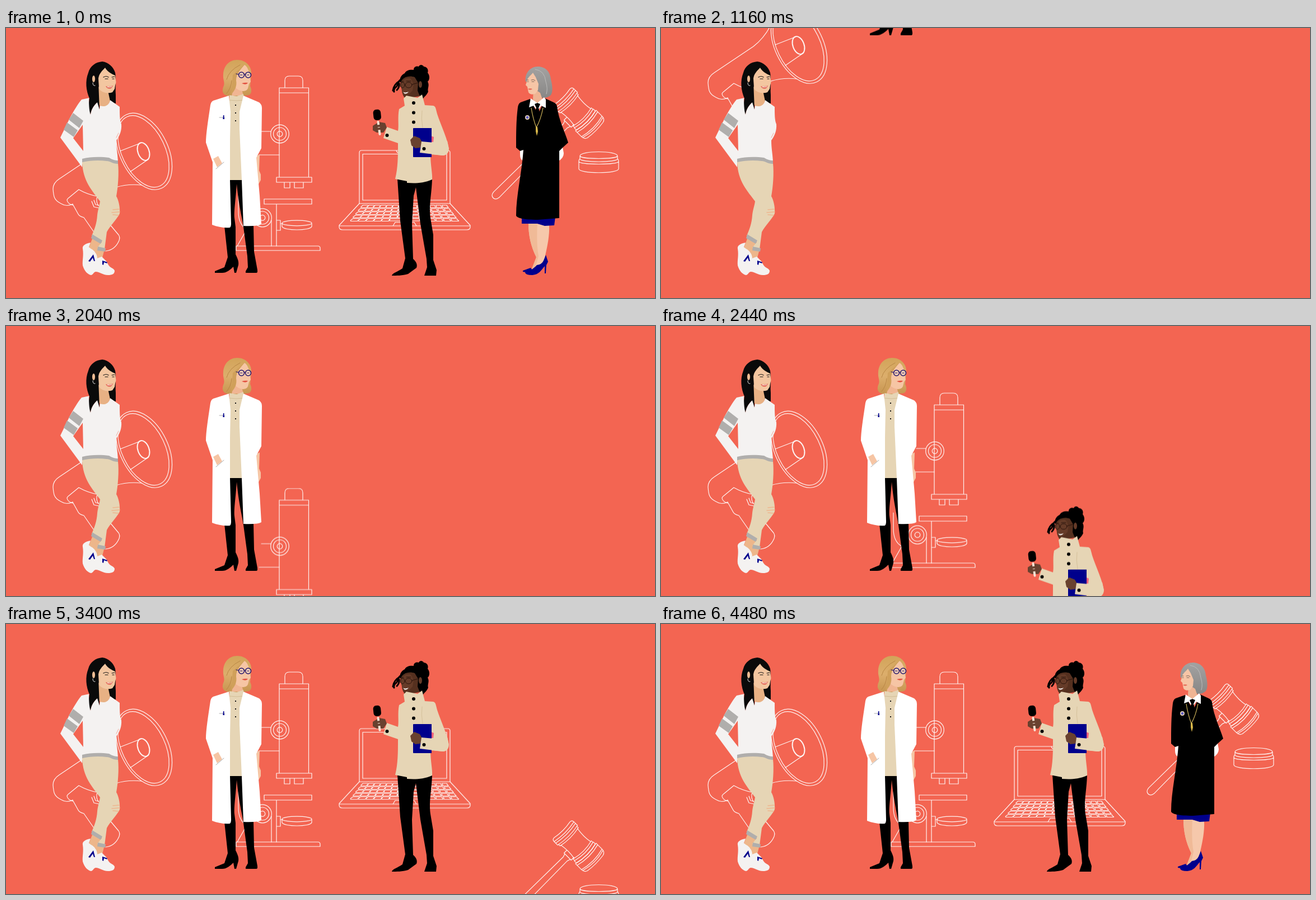
An HTML page that plays this animation: 1159x483 px, repeating every 7.28 s.

```html
<!DOCTYPE html>
<html lang="en">
<head>
<meta charset="utf-8">
<title>Four women at work</title>
<style>
html, body { margin: 0; width: 100%; height: 100%; overflow: hidden; background: #f36552; }
svg { display: block; width: 100vw; height: 100vh; }
.line { fill: none; stroke: #fff; stroke-opacity: .92; stroke-width: 1.2; stroke-linejoin: round; stroke-linecap: round; }
.cream { fill: #e6d5b5; }
.navy { fill: #00008c; }
.white { fill: #fff; }
.knit { fill: #f4f2f1; }
.gray { fill: #b0aeac; }
.thin { fill: none; stroke-linecap: round; }
</style>
</head>
<body>
<svg viewBox="0 0 1159 483" preserveAspectRatio="none">
<defs>
  <linearGradient id="silver" x1="0" y1="0" x2="0" y2="1">
    <stop offset="0" stop-color="#a3a2a1"/><stop offset="1" stop-color="#888786"/>
  </linearGradient>
  <linearGradient id="blonde" x1="0" y1="0" x2="0" y2="1">
    <stop offset="0" stop-color="#d2a459"/><stop offset=".5" stop-color="#dcae6c"/><stop offset="1" stop-color="#c79550"/>
  </linearGradient>
</defs>

<g id="megaphone" class="line">
  <ellipse cx="246.500" cy="220.700" rx="43" ry="73" transform="rotate(-25.7 246.5 220.7)"/>
  <ellipse cx="245.500" cy="220.700" rx="38.500" ry="68.500" transform="rotate(-25.7 245.5 220.7)"/>
  <ellipse cx="245.500" cy="221" rx="10" ry="16.500" stroke-width="2" transform="rotate(-20 245.5 221)"/>
  <path d="M204 220L240 206M222 257L254 235"/>
  <path d="M195 187C188 200 178 213 165 223L95 270Q84 277 84 288C85 300 85 308 98 314C106 319 112 318 119 315"/>
  <path d="M119 317Q110 314 109 308Q109 306 113 303L130 289Q146 298 163 301C180 290 205 277 242 281"/>
  <path d="M119 315L129 333Q131 337 139 339L157 365L172 388M186 352L201 370Q204 374 202 380Q195 397 178 399M153 310L157 320L166 322M157 308L160 316L166 317M163 301Q160 310 165 318"/>
</g>

<g id="activist">
  <path fill="#0a0a0a" d="M172 60C183 61 192 70 195 80C197 92 195 105 196 120V135L186 133L180 120L165 125L167 146L163 133C155 140 152 148 151 155C147 148 147 138 149 126C143 112 141 95 147 80C150 68 160 61 172 60Z"/>
  <path fill="#e8b184" d="M165 105L182 112L186 131L180 141H170L164 134Z"/>
  <path fill="#f3c6a0" d="M177 71C172 76 166 82 165 90L166 109C172 116 182 118 190 115L194 109L195 103L196.500 97L195 85C188 82 181 78 177 71Z"/>
  <ellipse cx="156.500" cy="91" rx="2.600" ry="6" fill="#eebb92"/>
  <path class="thin" stroke="#eee" d="M155 98Q155 104 159 103"/>
  <path fill="#0a0a0a" d="M176 70C168 76 164 84 165 96L167 146L160 128L160 86Z"/>
  <path class="thin" stroke="#111" stroke-width="1.200" d="M174 88Q179 85 183 88M189 88L194 87M177 91H182M190 91H193"/>
  <path fill="#e2604f" d="M178 104Q185 106 191 103Q189 109 184 108.500Q180 108 178 104Z"/>
  <path class="thin" stroke="#fff" d="M181 105.500Q186 106.500 189 105"/>
  <path class="knit" fill-rule="evenodd" d="M149 125L135 128C128 136 120 150 113 163L97 196L136 249V234L200 239C199 222 197 215 197 201C203 193 207 183 206 172C203 165 203 155 203 141L186 129C184 139 176 142 168 139L167 146L163 133C155 140 152 148 151 155Q148 148 148 126ZM137 173L120 197L138 220Z"/>
  <path class="thin" stroke="#f3a99d" d="M201 188L197 196"/>
  <path class="gray" d="M120 152L138 166L131 179L112 164ZM109 169L128 183L121 195L103 182Z"/>
  <path fill="#edb68a" d="M154 377L148 393L160 402L161 413L172 411L176 396L170 383Z"/>
  <path class="cream" d="M136 239C150 236 165 235 180 237L200 242C202 260 200 285 197 301C201 308 204 320 203 332C198 342 185 355 180 365L176 396L163 393L171 383L153 372C158 360 162 350 163 335C164 325 167 318 168 310C155 292 137 275 136 239Z"/>
  <path class="gray" d="M136 234C150 230 170 230 184 232C190 236 196 237 200 237V243C190 243 186 238 180 238C165 236 150 237 136 240ZM154 369L172 380L169 386L152 376ZM164 391L178 394L177 400L163 398Z"/>
  <path class="thin" stroke="#eeb68f" stroke-width="1.600" d="M191 325L202 324M189 330L203 329M191 334L201 335"/>
  <path class="knit" d="M151 384C140 386 136 390 137 395C139 408 136 415 137 425C140 435 146 441 152 442C156 441 156 437 160 436C168 436 172 442 182 442C190 442 194 440 194 434C192 429 187 430 183 424L179 417L171 409L163 412C163 405 158 398 152 395L148 392Z"/>
  <path class="navy" d="M147 417L156 405L159 417L157 417L155 411L150 418ZM172 416L181 419L180 421L175 419L174 424L172 423Z"/>
</g>

<g id="scope" class="line">
  <path d="M498 107V94Q498 86 506 86H522Q530 86 530 94V107M488 107H540.500V267H488ZM488 116H540.500M483 267H546V276H483ZM497 276V286H507V276M515 276V286H531V276"/>
  <path d="M456 185H473M452 227H488M461 306H546V315H461ZM483 315V390M483 344H490V362H483M490 350H494M474 344V390M415 300V328Q415 352 430 360L413 390"/>
  <path d="M411 398V390H557Q561 390 561 394V398Z"/>
  <ellipse cx="519.500" cy="349" rx="26.500" ry="4.800"/>
  <path d="M493 350V355C495 363 544 363 546 355V350"/>
  <g id="knob"><circle cx="489" cy="189.500" r="16.300"/><circle cx="489" cy="189.500" r="11.500"/><circle cx="489" cy="189.500" r="4.800"/></g>
  <use href="#knob" x="-31" y="150"/>
</g>

<g id="scientist">
  <path fill="url(#blonde)" d="M413 57C428 57 438 68 438 80L436 104C440 112 438 118 434 120L420 122H398C386 120 385 112 389 103C391 97 387 92 388 82C389 68 398 57 413 57Z"/>
  <path fill="#f0b592" d="M408 100L403 121H424L421 110Z"/>
  <path fill="#f6c5a4" d="M426 66C418 74 411 82 408 98L411 108C418 114 429 115 432 108L434 100L437 96L435 86C434 76 431 69 426 66Z"/>
  <path fill="#d0a05a" d="M426 65C418 76 411 82 411 94C413 104 408 114 401 119C404 106 404 94 405 84Z"/>
  <path class="thin" stroke="#b98745" d="M418 66Q398 76 394 92M403 94Q402 108 394 117"/>
  <g fill="#f3cdb5" stroke="#20146b" stroke-width="1.500"><circle cx="420.500" cy="84" r="5"/><circle cx="432.500" cy="84" r="5"/></g>
  <path class="thin" stroke="#20146b" stroke-width="1.200" d="M415 83L411 82M425 83H428M418 84H422M431 84H434"/>
  <path fill="#e2503f" d="M421 99Q427 97 432 98Q429 103 421 99Z"/>
  <path fill="#000" d="M399 271H421L425 300L436 340L442 354L443 400L449 433V436Q449 438 446 438H428V435L432 428L431 408L424 356C421 335 416 320 412 279C410 310 407 325 408 340L410 356V405C414 413 416 418 415 424L411 438H408L406 427C400 433 394 438 386 438H373V435L390 428L396 410L390 354Z"/>
  <path class="cream" d="M399 120L412 122L424 118L425 131L422 272H399Z"/>
  <path class="thin" stroke="#d2bd96" d="M399 129L411 130L424 129"/>
  <path fill="#111" d="M409 137h2v2h-2zM409 151h2v2h-2zM409 165h2v2h-2z"/>
  <path fill="#f6c5a4" d="M446 230L453 226L452 255L455 262V272L449 283L446 275Z"/>
  <path class="white" d="M398 121L370 130Q366 132 365 138C361 165 357 190 357 205L369 240L368 352C378 356 390 358 400 357Q402 355 402 350L400 272V200L401 150ZM424 121L452 133Q457 137 457 143L456 215L447 232L453 300L456 351Q450 355 424 354L421 272L417 180V150Z"/>
  <path fill="#f6c5a4" d="M370 234L379 229L386 242L377 249Z"/>
  <path class="thin" stroke="#aaa" d="M375 252L389 240M381 160H391"/>
  <path class="navy" d="M388 156h1.500v4l.8 3h-3z"/>
</g>

<g id="laptop" class="line">
  <path d="M631 314V223Q631 219 635 219H789Q793 219 793 223V314M637 225.500H787V308H637ZM697 219Q698 223 701 223H723Q726 223 727 219"/>
  <path d="M631 314H793L829 353V356Q829 361 823 361H601Q595 361 595 356V353ZM595 354H829M691 354L695 347.500H729L733 354"/>
</g>

<g id="reporter">
  <path fill="#000" d="M728 75C728 68 735 68 737 69C739 64 745 66 746 69C752 69 755 75 753 80C757 85 757 92 753 96C757 103 752 108 754 114C751 121 747 122 744 128C741 121 738 120 733 118L728 98L714 88L704 98C702 90 706 84 712 81C715 75 722 74 728 75Z"/>
  <path class="thin" stroke="#000" stroke-width="3" d="M706 92C698 95 702 102 696 106Q692 109 693 114M704 94C697 98 692 104 691 112M702 99Q703 106 698 111"/>
  <path fill="#55301f" d="M705 97C708 88 720 84 730 88L736 98L735 112L739 122L713 126C708 121 706 112 707 106L704 105Z"/>
  <path fill="#653b28" d="M706 98Q712 88 722 90Q730 98 726 112Q718 122 710 119L706 108Z"/>
  <ellipse cx="740" cy="101" rx="3" ry="6" fill="#653b28"/>
  <g class="thin" stroke="#2b140c"><ellipse cx="708" cy="102" rx="4" ry="5"/><ellipse cx="719" cy="102" rx="6" ry="5"/><path d="M725 101L736 98M706 96L710 96M715 95L723 95"/></g>
  <path class="white" d="M709 114.500Q714 116.500 719 114Q716 118 712 117.500Z"/>
  <path fill="#000" d="M699 270L730 274L761 270C760 300 755 315 758 340L763 370V415L769 433L768 443H747L752 428L751 413L740 350L732 285L728 300L725 350L727 413C733 418 735 424 733 429L718 440C708 443 697 443 689 443C690 438 700 436 708 430L713 412L704 345Z"/>
  <path class="cream" d="M710 126L715 121L735 125L743 119L748 138L763 139Q767 140 768 146C772 165 786 190 791 215Q791 227 780 228L758 226C758 245 762 262 761 271C745 278 730 278 716 277V274L695 270C700 250 700 230 700 206L674 197L680 177L700 184C702 175 699 160 702 145L712 139Z"/>
  <path class="thin" stroke="#d5c19b" d="M743 148Q741 162 744 178"/>
  <path fill="#69412f" d="M655 175L666 168L677 170L680 178L674 187L662 187L655 183Z"/>
  <path class="thin" stroke="#f6e2d3" stroke-width="4" d="M664.500 168L667.500 190"/>
  <path class="thin" stroke="#69412f" stroke-width="4" d="M658 176L668 175M659 181L668 180"/>
  <rect x="656" y="146" width="13.500" height="19" rx="5.500" transform="rotate(-6 662 155)"/>
  <path fill="#f0607a" d="M759 193L764 195L763 204H759Z"/>
  <path class="navy" d="M727 180Q727 179 728 179H760V231H728Q727 231 727 230Z"/>
  <path fill="#69412f" d="M722 200L729 193L739 197L743 204L740 214L731 215L724 210Z"/>
  <path class="cream" d="M742 203L764 205L768 190L788 202C792 218 790 228 780 228L739 223Z"/>
  <g><circle cx="728" cy="134" r="3"/><circle cx="728" cy="151.500" r="3"/><circle cx="728" cy="168.500" r="3"/><circle cx="680.500" cy="192" r="3"/><circle cx="746.500" cy="216" r="3"/></g>
</g>

<g id="gavel" class="line">
  <g transform="translate(1022 152) rotate(45)">
    <path d="M-36 -25Q-41 -25 -41 -20Q-37 0 -41 20Q-41 25 -36 25H-27Q-22 0 -27 -25ZM-36 -25Q-31 0 -36 25M-32 -25Q-27 0 -32 25M-27 -23H-23Q-18 0 -23 23H-27"/>
    <path d="M-23 -21Q-5 -18 10 -21M-23 21Q-5 18 10 21M10 -23H14Q20 0 14 23H10Q16 0 10 -23ZM14 -24H19Q25 0 19 24H14"/>
    <path d="M19 -26H34Q41 -26 43 -20Q46 0 43 20Q41 26 34 26H19Q26 0 19 -26M23 -26Q30 0 23 26M34 -26Q41 0 34 26M37 -25Q44 0 37 25"/>
    <path d="M-9 20V27H9V20M-7 27L-5 33L-7 207Q-6 215 0 215Q6 215 7 207L5 33L7 27"/>
  </g>
  <path d="M1025 229C1025 219 1092 219 1092 229V234C1092 241 1025 241 1025 234ZM1025 229C1027 235 1090 235 1092 229M1025 234Q1023 235 1023 239V252C1024 261 1093 261 1094 252V239Q1094 235 1092 234M1023 239C1026 245 1091 245 1094 239"/>
</g>

<g id="judge">
  <path fill="url(#silver)" d="M950 69C963 69 972 78 973 92C976 103 977 114 973 120C966 126 958 126 951 124L940 98L928 96C926 82 935 69 950 69Z"/>
  <path fill="#efb493" d="M942 108L954 116L958 128L949 136L941 128Z"/>
  <path fill="#f6c5a6" d="M941 80C936 86 930 90 930 96L928 102L931 105L933 115C936 120 942 119 946 117L950 111L951 100L946 88Z"/>
  <path class="thin" stroke="#bcbbba" d="M945 74Q962 76 964 96Q968 108 965 118"/>
  <path class="thin" stroke="#7b6257" d="M930 93H933M938 93Q942 91 945 94M931 96H933M939 96H943"/>
  <path fill="#e2604f" d="M932 109Q936 107.500 940 109Q936 112 932 109Z"/>
  <path fill="#f6c8ab" d="M933 349L970 352C971 370 967 390 963 407L961 425L950 436L938 435L947 410C937 390 933 370 933 349Z"/>
  <path fill="#f0ba97" d="M933 349H949Q947 385 951 408L944 434L938 433L947 410C937 390 933 370 933 349Z"/>
  <path class="navy" d="M921 339L981 338L979 353L962 354L949 350H921ZM927 437C935 436 945 428 948 424Q957 423 960 416L964 406L968 418L965 424L964 439H962V426C955 434 952 441 940 442Q927 442 927 437ZM923 434L937 429L940 433L934 438L923 436Z"/>
  <path class="white" d="M918 214L926 220L922 237Q918 234 918 226ZM994 213L996 224Q996 232 987 238L984 222Z"/>
  <path fill="#000" d="M936 127L919 133Q915 135 914 142C911 165 911 190 911 214L918 220L924 218C921 260 911 300 911 335C911 340 925 343 950 343L988 340V220L994 214L1004 205C998 185 987 165 984 140Q983 135 978 133L963 126L950 155Z"/>
  <path class="white" d="M937 126L949 134L961 124L964 128V143L956 139L949 148L942 139L934 142Z"/>
  <path fill="#000" d="M944 136L949 134L954 136L951 143L954 154L949 160L944 150L947 143Z"/>
  <path class="thin" stroke="#d3b75c" stroke-width="1.200" d="M938 143Q941 162 947 178Q955 164 959 143"/>
  <path fill="#d9b84a" d="M946 177h3l1 8l-2 8l-2 -8z"/>
  <circle cx="931" cy="160" r="3.200" fill="#5c5cc0" stroke="#f0d9b8" stroke-width="1.500"/>
</g>
</svg>
<script>
const LOOP = 7280, CLEAR = 160, TICK = 40;

// id, start ms, end ms, starting offset in px (positive comes from below)
const moves = [
  ['activist', 160, 1080, 422],
  ['megaphone', 600, 1560, -456],
  ['scientist', 1080, 2040, -464],
  ['scope', 1560, 2520, 409],
  ['reporter', 2040, 3000, 440],
  ['laptop', 2520, 3480, -382],
  ['gavel', 3000, 3960, 420],
  ['judge', 3520, 4480, -463]
];

function drawKeys() {
  const mid = 712, count = 14;
  let d = '';
  for (let row = 0; row < 5; row++) {
    const y = 317 + row * 6;
    const left = 636 - row * 4.5, pitch = (mid - left) * 2 / count;
    for (let i = 0; i < count; i++) {
      if (row === 4 && i > 4 && i < 9) continue;
      const x = left + i * pitch + 1.5, w = pitch - 3;
      const lean = (mid - x - w / 2) / 28;
      d += `M${x} ${y}h${w}q1.500 0 1 1.500l${-lean} 2.500q-.5 .5 -1 .5h${-w}q-1.500 0 -1 -1.500z`;
    }
  }
  d += 'M686 341H738L739 345H685Z';
  const path = document.createElementNS('http://www.w3.org/2000/svg', 'path');
  path.setAttribute('d', d);
  document.getElementById('laptop').append(path);
}

function slide([id, start, end, dist]) {
  const key = (ms, y, easing = 'linear') =>
    ({ offset: ms / LOOP, transform: `translateY(${y}px)`, easing });
  document.getElementById(id).animate([
    key(0, 0, 'steps(1)'),
    key(CLEAR, dist),
    key(start, dist, `steps(${(end - start) / TICK})`),
    key(end, 0),
    key(LOOP, 0)
  ], { duration: LOOP, iterations: Infinity });
}

drawKeys();
moves.forEach(slide);
</script>
</body>
</html>
```
